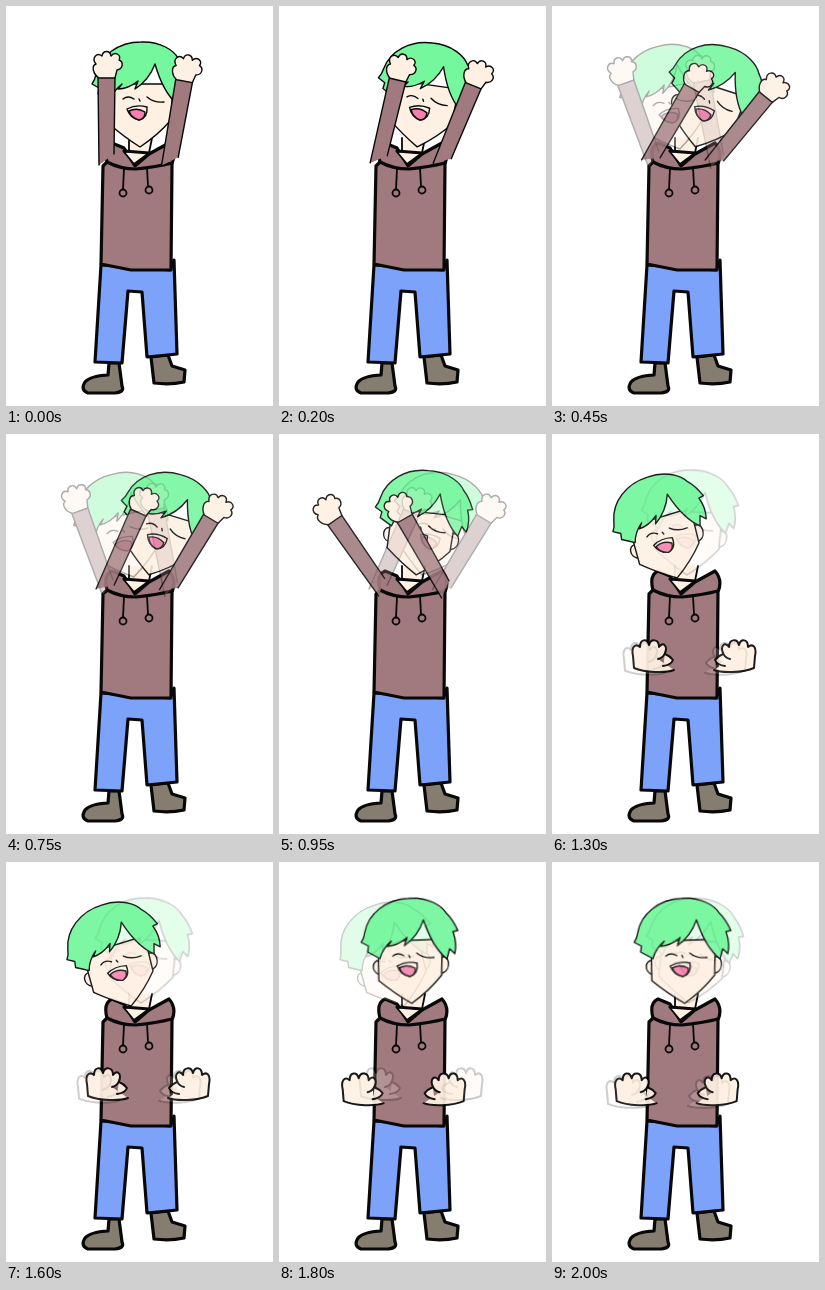
These frames come from a looping animation (267x400 px, 2050 ms). An HTML page:

```html
<!DOCTYPE html>
<html lang="en">
<head>
<meta charset="utf-8">
<title>Dance</title>
<style>
html, body { margin: 0; width: 100%; height: 100%; overflow: hidden; background: #fff; }
svg { display: block; width: 100%; height: 100%; }
path, circle { stroke: #080808; stroke-width: 1.4; stroke-linecap: round; stroke-linejoin: round; }
.bold path, .bold circle { stroke-width: 3.2; }
.bold .thin { stroke-width: 1.8; }
.skin { fill: #fef0e3; }
.hair { fill: #74f79d; }
.cloth { fill: #a07a7e; }
.jeans { fill: #7ca3f9; }
.shoe { fill: #857d70; }
.line { fill: none; }
</style>
</head>
<body>
<svg viewBox="0 0 267 400">
  <defs>
    <g id="head">
      <path class="skin" d="M104 97C96 95 94 108 103 111M166 96C174 94 175 109 166 112"/>
      <path class="skin" d="M103 78L102 117Q118 131 134 141Q152 129 165 114L167 78Z"/>
      <path class="hair" d="M104 95L99 92L92 88L93 82L86 78Q89 74 90 68C94 50 112 36 135 36C155 35 168 45 172 52Q178 58 183 70L178 71Q182 82 179 93L174 88L171 98Q157 86 149 58Q143 74 129 83L132 75Q122 83 112 83L116 78Q107 85 104 95Z"/>
      <path class="line" d="M117 93Q122 89 128 93M141 91Q148 97 158 96M133 93L134 95"/>
      <path class="skin" d="M121 103Q130 98 141 101Q142 112 133 114Q124 112 121 103Z"/>
      <path d="M123 105Q131 101 139 106Q139 113 133 114Q125 112 123 105Z" fill="#f67fae" stroke-width="1"/>
    </g>
    <g id="arm">
      <path class="cloth" d="M-8 9L-9 -79L8 -79L7 -2"/>
      <path class="skin" d="M-8 -78C-14 -82 -16 -90 -11 -92C-16 -98 -10 -104 -5 -100C-4 -106 3 -106 4 -100C8 -105 15 -101 12 -96C17 -94 16 -87 10 -86L8 -78Z"/>
    </g>
    <path id="palm" class="skin" style="stroke-width:2" d="M21 14C14 17 -8 17 -19 12L-20 0C-22 -9 -18 -13 -13 -9C-13 -17 -6 -18 -4 -11C-2 -18 6 -17 6 -9C10 -15 15 -10 12 -3Q10 2 5 3M12 -2Q17 0 20 4Q18 9 10 10"/>
  </defs>
  <g class="bold">
    <path class="shoe" d="M103 357L102 369Q84 370 79 376Q74 384 82 387L109 387Q119 386 116 380L113 357Z"/>
    <path class="shoe" d="M145 351L148 377Q164 379 178 376L179 364L166 360L162 349Z"/>
    <path class="jeans" d="M95 259L89 356L116 357L122 285L136 286L141 351L171 348L168 254L164 264Z"/>
    <path class="cloth" d="M97 160L101 156Q97 141 106 137L118 142L129 160L143 148L163 137Q171 146 166 158L165 264L125 264L95 258Z"/>
    <path class="skin thin" d="M123 132L123 145L118 146L128 158L143 147L146 132"/>
    <path class="line" d="M118 145L143 147"/>
    <path class="line" d="M101 156Q114 163 130 163Q150 161 166 157"/>
    <path class="line thin" d="M118 163L117 183M141 162L142 180"/>
    <circle class="cloth thin" cx="117" cy="187" r="3.5"/>
    <circle class="cloth thin" cx="143" cy="184" r="3.5"/>
  </g>
  <g id="stage"></g>
</svg>
<script>
const LOOP = 2050, STEP = 50, DELAY = 100;

// Raised arms: time, head tilt, left arm, right arm (degrees)
const swing = [
  [0, 0, 0, 10], [150, 18, 30, 39], [300, -12, -20, -11], [450, 18, 30, 39],
  [600, -12, -20, -11], [750, 17, 24, 31], [900, -10, -20, -11],
  [980, 16, -44, -41], [1100, 0, -145, -154]
];
// Palms in front: time, head tilt, palm shift
const sway = [
  [1150, 2, -9], [1300, -17, 0], [1450, 2, -9], [1600, -17, 0],
  [1750, 5, -26], [1900, -17, 0], [2050, 5, -26]
];
const keys = [...swing, ...sway];

const stage = document.getElementById("stage");

function makeFigure() {
  const g = document.createElementNS("http://www.w3.org/2000/svg", "g");
  g.innerHTML = ["head", "arm", "arm", "palm", "palm"]
    .map(id => `<use href="#${id}"/>`).join("");
  stage.append(g);
  return g;
}

const trail = makeFigure(), dancer = makeFigure(), haze = makeFigure();

function poseAt(t) {
  const list = t < sway[0][0] ? swing : sway;
  const i = list.findIndex(k => k[0] > t);
  if (i < 0) return list[list.length - 1];
  const a = list[i - 1], b = list[i], p = (t - a[0]) / (b[0] - a[0]);
  return a.map((v, n) => v + (b[n] - v) * p);
}

function setPose(fig, [, tilt, a, b]) {
  const [head, armL, armR, palmL, palmR] = fig.children;
  const raised = b !== undefined;
  const place = (el, value) => el.setAttribute("transform", value);
  place(head, `translate(${tilt * 0.5} ${tilt < 0 ? -tilt * 0.15 : 0}) rotate(${tilt} 135 142)`);
  for (const el of [armL, armR]) el.style.display = raised ? "" : "none";
  for (const el of [palmL, palmR]) el.style.display = raised ? "none" : "";
  if (raised) {
    place(armL, `translate(101 150) rotate(${a})`);
    place(armR, `translate(165 152) rotate(${b})`);
  } else {
    const y = 222 - a * 0.3;
    place(palmL, `translate(${101 + a} ${y})`);
    place(palmR, `translate(${183 + a} ${y}) scale(-1 1)`);
  }
}

function draw(now) {
  const t = Math.floor((now % LOOP) / STEP) * STEP;
  setPose(dancer, poseAt(t));
  // Afterimage of the last turning point
  const past = keys.filter(k => k[0] > 0 && k[0] < t - DELAY).pop();
  const strength = !past ? 0 : past.length > 3 ? 0.24 : 0.14;
  trail.setAttribute("opacity", strength);
  dancer.setAttribute("opacity", 1 - strength * 0.5);
  haze.setAttribute("opacity", strength * 0.5);
  if (past) {
    setPose(trail, past);
    setPose(haze, past);
  }
}

const start = performance.now();
function tick() {
  draw(performance.now() - start);
  requestAnimationFrame(tick);
}
tick();
</script>
</body>
</html>
```
